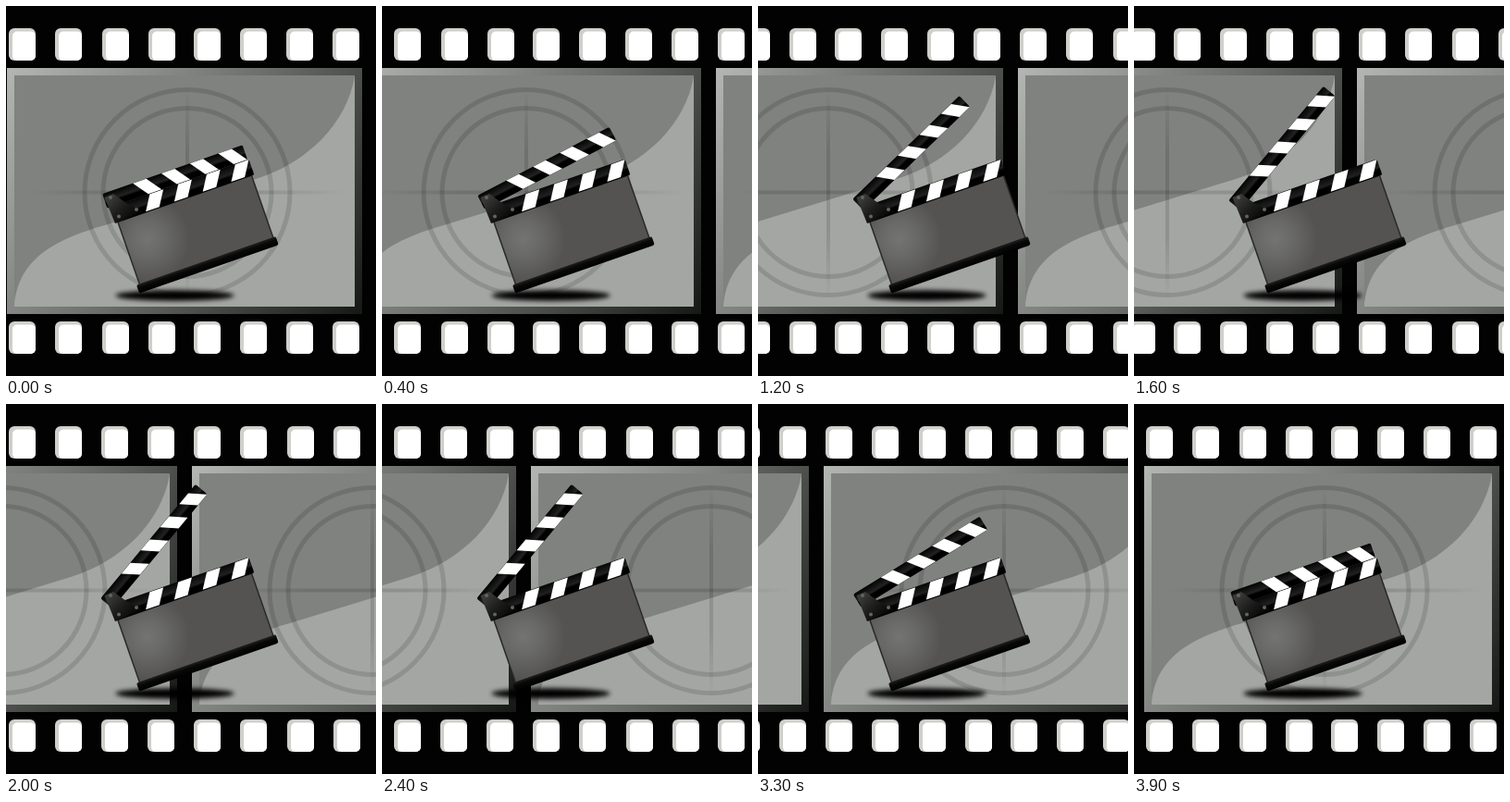
An HTML page with a canvas for the animation above (4 s loop, 400 by 400 pixels).

```html
<!DOCTYPE html>
<html lang="en">
<head>
<meta charset="utf-8">
<title>Film strip and clapperboard</title>
<style>
  html, body { margin: 0; width: 100%; height: 100%; overflow: hidden; background: #000; }
  canvas { display: block; width: 400px; height: 400px; }
</style>
</head>
<body>
<canvas id="stage" width="400" height="400"></canvas>
<script>
const ctx = document.getElementById('stage').getContext('2d');
const STEP_MS = 100, STEPS = 40;
const TILT = -19.2 * Math.PI / 180;
const OPEN_STEP = 2.07 * Math.PI / 180;
const STRIPE_GAP = 32.6;
const HOLES = [3, 53, 104, 154, 203, 253, 303, 353];

function withStops(g, stops) {
  stops.forEach(([at, color]) => g.addColorStop(at, color));
  return g;
}

function gradient(x0, y0, x1, y1, ...stops) {
  return withStops(ctx.createLinearGradient(x0, y0, x1, y1), stops);
}

function glow(x, y, r, ...stops) {
  return withStops(ctx.createRadialGradient(x, y, 0, x, y, r), stops);
}

function poly(fill, ...points) {
  ctx.beginPath();
  points.forEach(([x, y]) => ctx.lineTo(x, y));
  ctx.closePath();
  ctx.fillStyle = fill;
  ctx.fill();
}

function roundRect(fill, x, y, w, h, r) {
  ctx.beginPath();
  ctx.roundRect(x, y, w, h, r);
  ctx.fillStyle = fill;
  ctx.fill();
}

function placed(x, y, angle, draw) {
  ctx.save();
  ctx.translate(x, y);
  ctx.rotate(angle);
  draw();
  ctx.restore();
}

function drawHole(x, y) {
  roundRect('#cfd0cc', x, y, 29, 35, 6);
  roundRect('#fff', x + 4, y + 3.5, 25, 31.5, 5);
}

function drawTarget() {
  ctx.strokeStyle = 'rgba(0,0,0,.13)';
  ctx.lineWidth = 5;
  for (const r of [91, 111]) {
    ctx.beginPath();
    ctx.arc(196, 201.5, r, 0, Math.PI * 2);
    ctx.stroke();
  }
  const fade = [[0, 'rgba(0,0,0,0)'], [.3, 'rgba(0,0,0,.13)'], [.7, 'rgba(0,0,0,.13)'], [1, 'rgba(0,0,0,0)']];
  ctx.fillStyle = gradient(24, 0, 368, 0, ...fade);
  ctx.fillRect(24, 199.5, 344, 4);
  ctx.fillStyle = gradient(0, 86, 0, 317, ...fade);
  ctx.fillRect(194, 86, 4, 231);
}

function drawPanel() {
  ctx.fillStyle = gradient(1, 67, 385, 333, [0, '#b4b6b3'], [.5, '#6b6d6a'], [1, '#161816']);
  ctx.fillRect(1, 67, 384, 266);
  ctx.fillStyle = '#80827f';
  ctx.fillRect(9, 75, 368, 250);
  ctx.beginPath();
  ctx.moveTo(9, 325);
  ctx.bezierCurveTo(13, 270, 58, 251, 110, 236);
  ctx.lineTo(270, 187);
  ctx.bezierCurveTo(325, 170, 368, 128, 377, 76);
  ctx.lineTo(377, 325);
  ctx.fillStyle = '#a4a6a3';
  ctx.fill();
  drawTarget();
}

function drawFilm(shift) {
  for (const offset of [-shift, 400 - shift]) {
    placed(offset, 0, 0, () => {
      drawPanel();
      for (const x of HOLES) {
        drawHole(x, 24);
        drawHole(x, 341);
      }
    });
  }
}

function drawStripes(topX, topY, bottomX, bottomY, width) {
  for (let i = 0; i < 4; i++) {
    const d = i * STRIPE_GAP;
    poly('#fff', [topX + d, topY], [topX + d + width, topY],
      [bottomX + d + width, bottomY], [bottomX + d, bottomY]);
  }
}

function drawShadow() {
  ctx.save();
  ctx.filter = 'blur(2.7px)';
  ctx.beginPath();
  ctx.ellipse(182.5, 313, 64, 5.7, 0, 0, Math.PI * 2);
  ctx.fillStyle = '#000';
  ctx.fill();
  ctx.restore();
}

function drawBoard() {
  ctx.fillStyle = glow(26, 28, 46, [0, '#747472'], [.4, '#696967'], [1, '#545351']);
  ctx.fillRect(2, 0, 153, 72);
  ctx.strokeStyle = '#292a28';
  ctx.lineWidth = 1.5;
  ctx.strokeRect(2, 0, 153, 72);
  roundRect(gradient(0, 71, 0, 81, [0, '#20211f'], [.35, '#090909'], [1, '#000']), -1.5, 71, 159.5, 9.7, 2);
  roundRect(gradient(0, -17, 0, 0, [0, '#080808'], [.5, '#202020'], [.65, '#000']), -1, -17.5, 159, 18, 1.5);
  drawStripes(44.5, -17, 34.2, -.5, 15.5);
}

function drawArm() {
  roundRect(gradient(0, -10, 0, 6, [0, '#050505'], [.5, '#222'], [.65, '#000']), -9, -10.5, 160.5, 16.7, 2);
  drawStripes(26, -10.3, 38, 6, 15.3);
}

function drawHinge() {
  poly(gradient(112, 208, 136, 230, [0, '#3a3b39'], [.5, '#1d1d1c'], [1, '#080808']),
    [106.5, 207], [116, 203], [130, 213], [148, 222], [118, 235]);
  for (const [x, y] of [[113, 207], [122, 227.5], [141, 220]]) {
    ctx.beginPath();
    ctx.arc(x, y, 2, 0, Math.PI * 2);
    ctx.fillStyle = '#626461';
    ctx.fill();
  }
}

function render(now) {
  const step = Math.floor(now / STEP_MS) % STEPS;
  const opening = Math.min(step, 15, STEPS - 1 - step) * OPEN_STEP;
  ctx.fillStyle = '#010201';
  ctx.fillRect(0, 0, 400, 400);
  drawFilm(step * 10);
  drawShadow();
  placed(119, 234, TILT, drawBoard);
  placed(116, 210, TILT - opening, drawArm);
  drawHinge();
}

let start;
function tick(now) {
  start ??= now;
  render(now - start);
  requestAnimationFrame(tick);
}
render(0);
requestAnimationFrame(tick);
</script>
</body>
</html>
```
